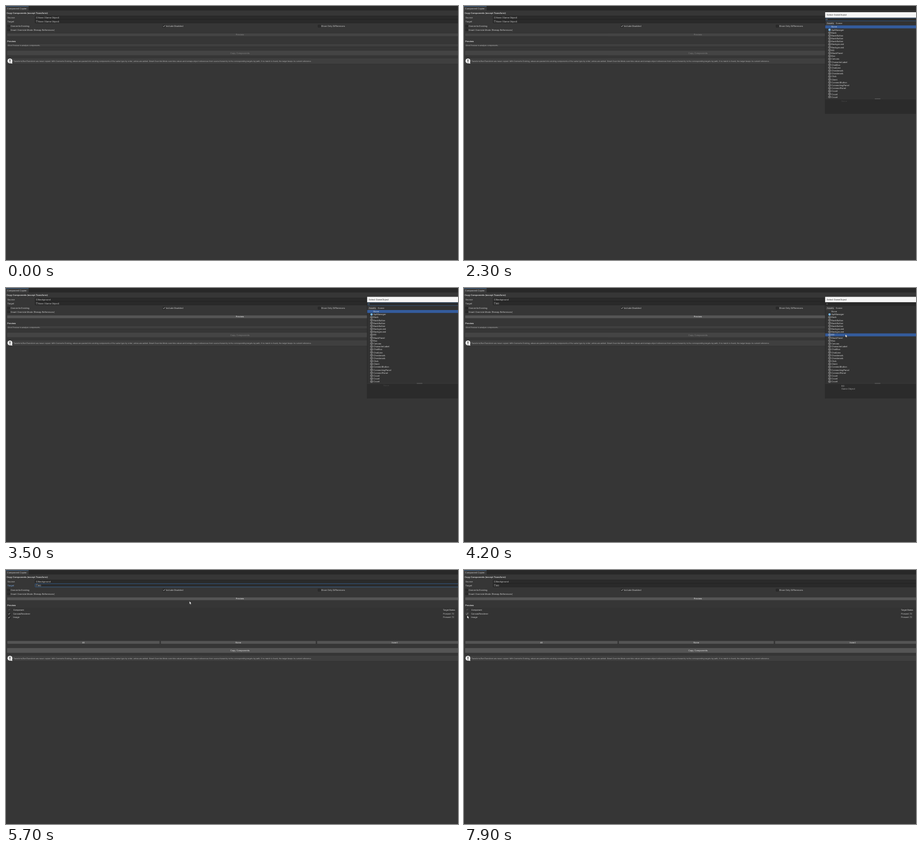
Recreate the animation shown at these times as an HTML page. Size 800 by 450 pixels, loop 8000 ms.

```html
<!DOCTYPE html>
<html lang="en">
<head>
<meta charset="utf-8">
<style>
  html, body { margin: 0; width: 100%; height: 100%; overflow: hidden; background: #363636; }
  svg { display: block; width: 800px; height: 450px; }
  text { font-family: Inter, Roboto, sans-serif; text-rendering: geometricPrecision; white-space: pre; }
</style>
</head>
<body>
<svg id="stage" viewBox="0 0 800 450"></svg>
<script>
const stage = document.getElementById('stage');
const LOOP = 8000, STEP = 100;
const ROW = 5.18;
const BLUE = '#3d79bd', LINK = '#7fb0ee', LIGHT = '#cdcdcd';

const HELP = 'Transform/RectTransform are never copied. With Overwrite Existing, values are pasted into existing ' +
  'components of the same type by order; extras are added. Smart Override Mode overrides values and remaps object ' +
  'references from source hierarchy to the corresponding targets by path; if no match is found, the target keeps ' +
  'its current reference.';

const OBJECTS = ('None,ApiManager,Back,BackButton,BackButton,BackButton,Background,Background,BG,BlackPanel,Box,' +
  'Canvas,CharacterLabel,ChatBox,ChatLine,Checkmark,Checkmark,Click,Client,ConnectButton,ConnectingPanel,' +
  'ConnectPanel,Count,Count,Count').split(',');

// Cursor runs: [time, x, y] points, hidden between runs.
const RUNS = [
  [[300, 666, 1], [500, 330, 136], [700, 7, 40], [800, 60, 24], [1100, 608, 53], [1200, 663, 30]],
  [[2400, 790, 40], [2600, 668, 66], [2900, 668, 66], [3000, 745, 48]],
  [[3600, 785, 45], [3900, 675, 82], [4500, 675, 82], [5000, 470, 56], [5200, 448, 48],
   [5600, 448, 48], [5900, 78, 70], [6200, 8, 77], [6600, 8, 77], [6900, 410, 126],
   [7100, 410, 126], [7300, 137, 126], [7400, 137, 126], [7600, 6, 79.5], [7800, 5.5, 80.5], [8000, 5.5, 80.5]],
];

function cursorAt(t) {
  const run = RUNS.find(r => t >= r[0][0] && t <= r[r.length - 1][0]);
  if (!run) return null;
  const i = Math.max(1, run.findIndex(p => p[0] >= t));
  const [t0, x0, y0] = run[i - 1], [t1, x1, y1] = run[i];
  const k = (t - t0) / (t1 - t0);
  return [x0 + (x1 - x0) * k, y0 + (y1 - y0) * k];
}

const rect = (x, y, w, h, fill, extra = '') =>
  `<rect x="${x}" y="${y}" width="${w}" height="${h}" fill="${fill}" ${extra}/>`;

const path = (d, stroke, width = 0.6) =>
  `<path d="${d}" fill="none" stroke="${stroke}" stroke-width="${width}"/>`;

// Text placed by the vertical centre of its line.
function text(x, y, str, { size = 3.9, fill = LIGHT, weight = 400, anchor = 'start' } = {}) {
  return `<text x="${x}" y="${y + size * 0.36}" font-size="${size}" fill="${fill}" font-weight="${weight}" text-anchor="${anchor}">${str}</text>`;
}

function button(x, y, w, h, label, { enabled = true, hover = false } = {}) {
  const fill = !enabled ? '#444' : hover ? '#686868' : '#555';
  return rect(x, y, w, h, fill, 'rx=".8" stroke="#2b2b2b" stroke-width=".35"') +
    text(x + w / 2, y + h / 2, label, { anchor: 'middle', fill: enabled ? '#e6e6e6' : '#808080' });
}

function checkbox(x, y, checked, outline = '#222') {
  return rect(x - 2.2, y - 2.2, 4.4, 4.4, '#2a2a2a', `rx=".6" stroke="${outline}" stroke-width=".4"`) +
    (checked ? path(`M${x - 1.5} ${y}l1.1 1.2 2-2.6`, '#e4e4e4', 0.7) : '');
}

function objectField(y, label, value, focused, pressed) {
  const edge = focused || pressed ? BLUE : '#212121';
  return text(2.5, y, label, { fill: focused ? LINK : LIGHT }) +
    rect(51.7, y - 2.9, 780, 5.8, '#2a2a2a', `rx=".6" stroke="${edge}" stroke-width=".6"`) +
    rect(53.2, y - 1.4, 2.6, 2.8, 'none', 'stroke="#8b8b8b" stroke-width=".4"') +
    path(`M53.2 ${y - 0.4}h2.6`, '#8b8b8b', 0.3) +
    text(56.8, y, value);
}

function helpBox(y) {
  return rect(0.5, y - 5.3, 830, 10.6, '#3f3f3f', 'rx=".8" stroke="#2a2a2a" stroke-width=".4"') +
    `<circle cx="7" cy="${y - 0.3}" r="4.3" fill="#f2f2f2"/>` +
    `<path d="M7 ${y + 3.5}l4.2 1.2-.7-4z" fill="#f2f2f2"/>` +
    rect(6.4, y - 3, 1.2, 3.6, '#222') + rect(6.4, y + 1.2, 1.2, 1.2, '#222') +
    text(13, y, HELP, { size: 3.22, fill: '#bdbdbd' });
}

function cubeIcon(x, y, filled) {
  if (filled) return `<circle cx="${x}" cy="${y}" r="2.1" fill="#78b7ea"/>`;
  return path(`M${x} ${y - 2}l1.9 .9v2.2l-1.9 1-1.9-1v-2.2zM${x - 1.9} ${y - 1.1}l1.9 1 1.9-1M${x} ${y - 0.1}v2.2`, '#c0c0c0', 0.5);
}

function picker(top, selected) {
  const listTop = top + 23.4;
  let out = rect(639.2, top, 170, 179.5, '#323232', 'stroke="#242424" stroke-width=".6"') +
    rect(639.2, top, 170, 9.6, '#f6f6f6') +
    text(642, top + 4.9, 'Select GameObject', { fill: '#333' }) +
    rect(640.6, top + 10.5, 170, 4.8, '#292929', `rx=".6" stroke="${selected ? '#222' : BLUE}" stroke-width=".5"`) +
    `<circle cx="642.5" cy="${top + 12.7}" r=".8" fill="none" stroke="#bbb" stroke-width=".4"/>` +
    rect(640.5, top + 17, 15, 6.4, '#3d3d3d') +
    text(642.3, top + 20, 'Assets') + text(658, top + 20, 'Scene');
  OBJECTS.forEach((name, i) => {
    const y = top + 26 + i * ROW;
    if (i === selected) out += rect(639.4, listTop + i * ROW, 170, ROW, '#345c9d');
    if (i) out += cubeIcon(647, y, i === 1);
    out += text(650.3, y, name, { fill: '#d6d6d6' });
  });
  out += rect(639.4, top + 152.8, 170, 26.5, '#2b2b2b') +
    rect(639.4, top + 152.4, 170, 2, '#343434') +
    path(`M727 ${top + 153.4}h10`, '#777', 0.7);
  return out + (selected
    ? text(668, top + 157.5, OBJECTS[selected], { fill: '#aaa' }) + text(668, top + 162.5, 'Game Object', { fill: '#aaa' })
    : text(668, top + 157.2, 'None', { fill: '#484848' }));
}

function arrow([x, y]) {
  return `<path transform="translate(${x} ${y})" d="M0 0V5.3L1.2 4.2 2 6.1 2.9 5.7 2.1 3.9H3.7Z" fill="#fff" stroke="#111" stroke-width=".35"/>`;
}

function componentList(t) {
  const canvasOn = t < 6400 || t >= 7400;
  const imageOn = t < 7000 || (t >= 7400 && t < 7900);
  const present = { fill: '#c4c4c4' };
  return rect(1.5, 66.7, 830, 57.5, '#333') +
    path('M4.4 70.2l1 1 1.8-2.2', '#8a8a8a', 0.5) +
    text(13, 71, 'Component', { size: 3.3, weight: 600 }) +
    text(773.5, 71, 'Target Status', { size: 3.3, weight: 600 }) +
    checkbox(5.5, 77.5, canvasOn, t >= 6400 && t < 7000 ? BLUE : t >= 7400 ? '#707070' : '#222') +
    text(12.5, 77.5, 'CanvasRenderer') + text(773.5, 77.5, 'Present (1)', present) +
    checkbox(5.5, 84, imageOn) +
    text(12.5, 84, 'Image') + text(773.5, 84, 'Present (1)', present) +
    button(2, 125.4, 270, 5.6, 'All', { hover: t >= 7300 && t < 7500 }) +
    button(273.8, 125.4, 274.8, 5.6, 'None', { hover: t >= 6900 && t < 7200 }) +
    button(550.3, 125.4, 274.8, 5.6, 'Invert') +
    button(1.5, 138, 825, 9, 'Copy Components', { enabled: canvasOn || imageOn }) +
    helpBox(156.5);
}

function emptyPreview() {
  return rect(1, 66.8, 830, 5.3, '#3f3f3f', 'rx=".6" stroke="#2a2a2a" stroke-width=".4"') +
    text(3, 69.4, 'Click Preview to analyze components.', { size: 3.22, fill: '#bdbdbd' }) +
    button(1.5, 78.7, 825, 9, 'Copy Components', { enabled: false }) +
    helpBox(97.5);
}

function render(t) {
  const source = t >= 2700 ? 'Background' : 'None (Game Object)';
  const target = t >= 4200 ? 'BG' : 'None (Game Object)';
  const cursor = cursorAt(t);
  let out = rect(0, 0, 800, 450, '#363636') +
    rect(0, 0, 800, 8, '#282828') + rect(0, 0, 40, 8, '#3a3a3a') + rect(0, 0, 40, 0.6, '#3a72b0') +
    text(1.8, 4.2, 'Component Copier') +
    text(1.2, 12.6, 'Copy Components (except Transform)', { weight: 700 }) +
    objectField(20.6, 'Source', source, t >= 3000 && t < 3500, t >= 2000 && t < 2300) +
    objectField(27.1, 'Target', target, t >= 4600 && t < 6400, t >= 3300 && t < 3500) +
    checkbox(4.7, 35.6, false) + text(8, 35.6, 'Overwrite Existing') +
    checkbox(279.7, 35.6, true) + text(283, 35.6, 'Include Disabled') +
    checkbox(554.5, 35.6, false, t >= 3000 && t < 3200 ? '#777' : '#222') + text(557.7, 35.6, 'Show Only Differences') +
    checkbox(4.7, 42.1, false) + text(8, 42.1, 'Smart Override Mode (Remap References)') +
    button(1.8, 48.2, 824.4, 5.6, 'Preview', { enabled: t >= 2700, hover: t >= 5200 && t < 5700 }) +
    text(2.2, 63, 'Preview', { weight: 700 }) +
    (t >= 5600 ? componentList(t) : emptyPreview());
  if (t >= 2300 && t < 3000) out += picker(11, t >= 2700 ? 6 : 0);
  if (t >= 3500 && t < 4600) out += picker(15.6, t >= 4200 ? 8 : 0);
  if (cursor) out += arrow(cursor);
  stage.innerHTML = out;
}

const start = performance.now();
let shown = -1;
function tick(now) {
  const t = Math.floor((Math.max(0, now - start) % LOOP) / STEP) * STEP;
  if (t !== shown) render(shown = t);
  requestAnimationFrame(tick);
}
tick(start);
</script>
</body>
</html>
```
